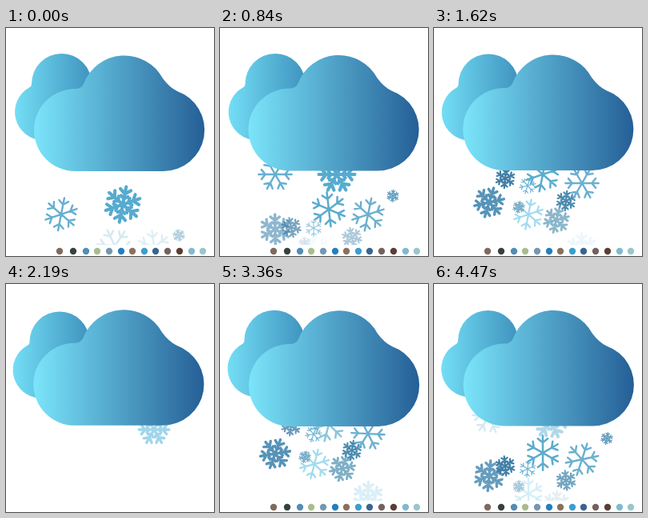
These frames come from a looping animation (260 px wide and 285 px high, 4.5 s). An HTML page with a canvas:

```html
<!DOCTYPE html>
<html>
<head>
<meta charset="utf-8">
<style>
html, body { margin: 0; height: 100%; overflow: hidden; background: #fff; }
canvas { display: block; }
</style>
</head>
<body>
<canvas id="stage" width="260" height="285"></canvas>
<script>
const ctx = document.getElementById('stage').getContext('2d');
const LOOP = 4500, CYCLE = 250, FLOOR = 271, SPIN = -.007;
const clamp = (v, lo = 0, hi = 1) => Math.min(hi, Math.max(lo, v));

// Time (ms) -> distance fallen; the snowfall repeats every CYCLE.
const fall = [[0, 170], [840, 373], [1620, 578], [2190, 750],
  [2790, 910], [3840, 1205], [4470, 1357], [4500, 1364]];

// Cycle position, then front cloud x, y and back cloud x, y.
const drift = [
  [0, -.7, -2.2, -2.5, 2.5], [78, 1.2, -1, -1.5, .5], [107, 1.7, -1.5, -2, 1],
  [123, .5, -.5, -.5, 0], [160, -.3, .5, .5, -1], [170, 0, 0, 0, 0],
  [205, 1.5, -2, -1.5, 2.5], [CYCLE, -.7, -2.2, -2.5, 2.5]
];

function track(keys, at) {
  let i = 1;
  while (i < keys.length - 1 && keys[i][0] < at) i++;
  const a = keys[i - 1], b = keys[i], k = (at - a[0]) / (b[0] - a[0]);
  return a.slice(1).map((v, n) => v + (b[n + 1] - v) * k);
}

const THIN = { width: .11, barbs: [[.56, .27]] };
const BOLD = { width: .17, barbs: [[.3, .18], [.56, .28]] };

// x, y and tilt at cycle position `from`, speed, radius, style, colour, end
const flakes = [
  [185, 182, .52, 0, 1.2, 20, BOLD, '#a0d5ec'],
  [118, 233, .2, 78, 1, 20, THIN, '#a0dbef'],
  [106, 224, .2, 78, 1, 8, BOLD, '#78abc5'],
  [117, 197, .3, 78, 1.18, 11, THIN, '#6db3d3'],
  [153, 240, .25, 78, 1.2, 17, BOLD, '#7eafc6'],
  [69, 218, .3, 78, .75, 20, BOLD, '#5593b8'],
  [89, 188, .1, 78, 1.36, 13, BOLD, '#3f7da5'],
  [165, 216, .1, 78, 1.02, 13, BOLD, '#4a8bb0'],
  [136, 183, .2, 78, .97, 23, THIN, '#5caccd'],
  [185, 194, .52, 78, .87, 22, THIN, '#6cb0cf'],
  [216, 193, .2, 107, 1.05, 8, BOLD, '#5f9dbd'],
  [69, 183, .52, 123, 1.06, 22, THIN, '#65b0cf'],
  [146, 183, .52, 123, .8, 24, BOLD, '#56abcf', 208]
];

const icons = [
  [67, '#806a5c'], [84, '#35423f'], [100, '#528db5'], [114, '#a8bd8d'],
  [129, '#7598b0'], [144, '#247fc0'], [158, '#8b705f'], [173, '#3b9ed1'],
  [187, '#38658f'], [202, '#75615e'], [217, '#5b3e35'], [232, '#83b9ce'],
  [246, '#9bc5cc']
];

const frontCloud = new Path2D('M86.5 179A51.5 51.5 0 0 1 86.5 76Q94 76 97 70' +
  'A54.5 54.5 0 0 1 196 63Q204 74 214 79A51.5 51.5 0 0 1 197 179Z');
const backCloud = new Path2D('M45 140A35 35 0 0 1 29 74.5Q32 73 32 69.5' +
  'A37.5 37.5 0 0 1 107 69.5L107 140Z');

function blend(x0, x1, from, to) {
  const g = ctx.createLinearGradient(x0, 0, x1, 0);
  g.addColorStop(0, from);
  g.addColorStop(1, to);
  return g;
}
const frontFill = blend(35, 248, '#7be5fa', '#255f96');
const backFill = blend(10, 108, '#74dff6', '#3f92be');

function drawCloud(path, fill, x, y) {
  ctx.save();
  ctx.translate(x, y);
  ctx.fillStyle = fill;
  ctx.fill(path);
  ctx.restore();
}

function drawFlake(u, [x, y0, tilt, from, speed, r, style, colour, end = 198]) {
  const y = y0 + (u - from) * speed;
  const alpha = clamp((y - 160) / 22) * clamp((285 - y) / 50);
  const size = r * clamp((end - u) / 26);
  if (!alpha || !size) return;
  ctx.save();
  ctx.translate(x, y);
  ctx.rotate(tilt + (u - from) * SPIN);
  ctx.scale(size, size);
  ctx.globalAlpha = alpha;
  ctx.strokeStyle = colour;
  ctx.lineWidth = style.width;
  ctx.lineCap = 'round';
  ctx.beginPath();
  for (let arm = 0; arm < 6; arm++) {
    ctx.moveTo(0, 0);
    ctx.lineTo(0, -.94);
    for (const [base, len] of style.barbs) {
      ctx.moveTo(-len, -base - len * .8);
      ctx.lineTo(0, -base);
      ctx.lineTo(len, -base - len * .8);
    }
    ctx.rotate(Math.PI / 3);
  }
  ctx.stroke();
  ctx.restore();
}

function drawSnow(u) {
  ctx.save();
  ctx.beginPath();
  ctx.rect(0, 0, 260, FLOOR);
  ctx.clip();
  for (const flake of flakes) drawFlake(u, flake);
  ctx.restore();
}

function drawIcons() {
  for (const [x, colour] of icons) {
    ctx.fillStyle = colour;
    ctx.beginPath();
    ctx.arc(x, 279, 4.2, 0, Math.PI * 2);
    ctx.fill();
  }
}

function draw() {
  const t = Math.floor(performance.now() % LOOP / 30) * 30;
  const u = track(fall, t)[0] % CYCLE;
  const [fx, fy, bx, by] = track(drift, u);
  ctx.clearRect(0, 0, 260, 285);
  drawSnow(u);
  if (u > 50 && u < 190) drawIcons();
  drawCloud(backCloud, backFill, bx, by);
  drawCloud(frontCloud, frontFill, fx, fy);
  requestAnimationFrame(draw);
}
draw();
</script>
</body>
</html>
```
